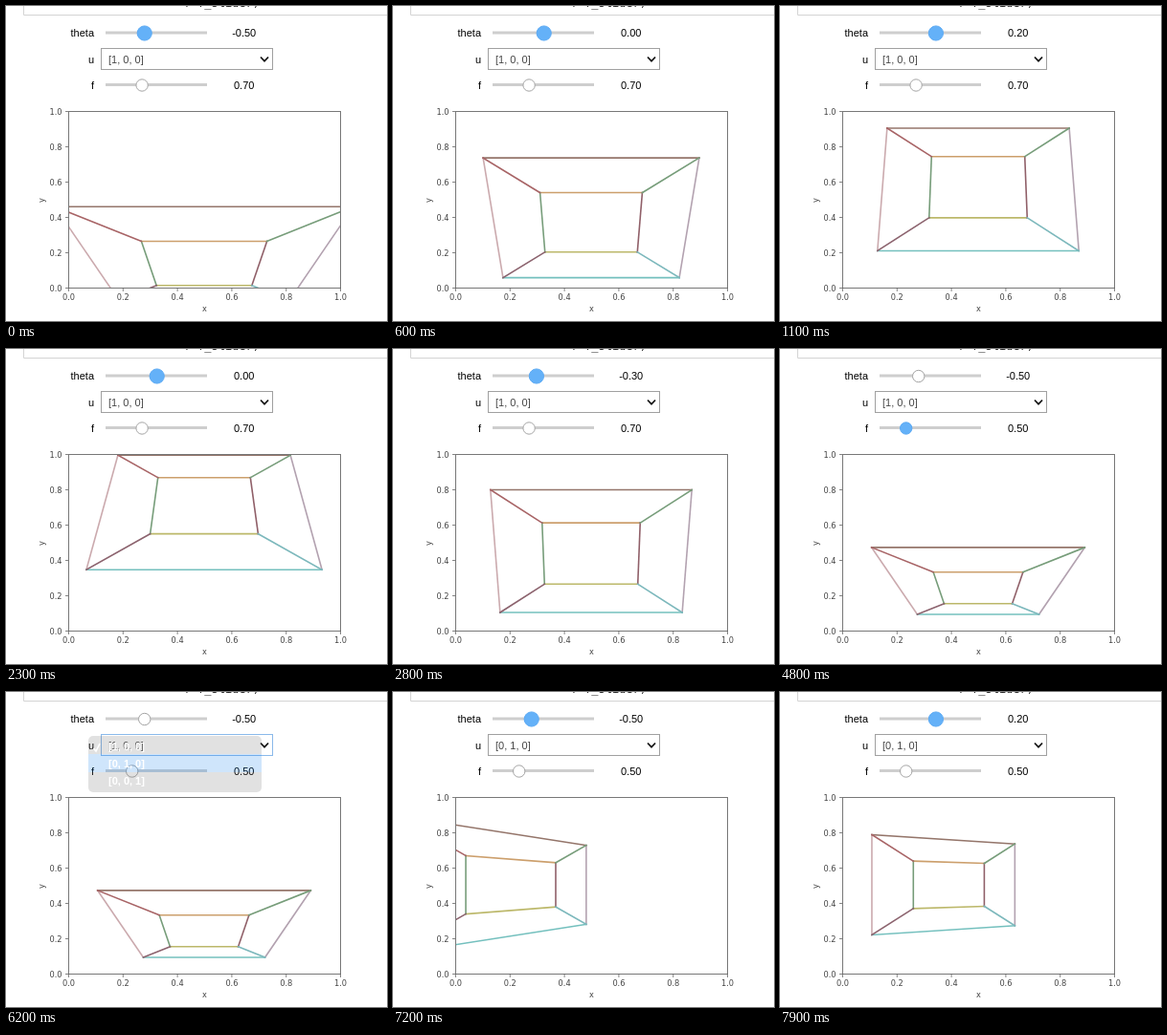
An HTML page with a canvas for the animation above (8 s loop, 398 px wide and 330 px high).

```html
<!DOCTYPE html>
<html lang="en">
<head>
<meta charset="utf-8">
<title>Cube projection</title>
<style>
html, body { margin: 0; width: 100%; height: 100%; overflow: hidden; background: #fff; }
canvas { display: block; }
</style>
</head>
<body>
<canvas id="stage" width="398" height="330"></canvas>
<script>
const ctx = document.getElementById('stage').getContext('2d');
const UI = '11px "Liberation Sans", Arial, sans-serif';
const PLOT = '8.2px "DejaVu Sans", sans-serif';
const MONO = '12px "DejaVu Sans Mono", monospace';
const X0 = 65, Y0 = 295, W = 285, H = 185;
const OPTIONS = ['[1, 0, 0]', '[0, 1, 0]', '[0, 0, 1]'];

// Corner index bits: 1 = right, 2 = top, 4 = far
const EDGES = [
  [0, 2, '#cbaaae'], [1, 3, '#b3a2b0'], [0, 1, '#74c0be'], [2, 3, '#94756a'],
  [4, 5, '#bcb86a'], [6, 7, '#cc9f6c'], [4, 6, '#779d7a'], [5, 7, '#906069'],
  [0, 4, '#8c636e'], [1, 5, '#7cb8bc'], [2, 6, '#a86466'], [3, 7, '#779d7a']
];

// Slider values as [time, value] steps
const THETA = [
  [0, -.5], [100, -.4], [200, -.3], [400, -.2], [500, -.1], [600, 0], [800, .1], [1000, .2],
  [1200, .3], [1400, .4], [2100, .3], [2200, .1], [2300, 0], [2400, -.1], [2600, -.2],
  [2800, -.3], [3000, -.4], [3200, -.5], [7500, -.3], [7600, -.2], [7700, 0], [7800, .1], [7900, .2]
];
const FOCAL = [[0, .7], [4100, .6], [4400, .5]];
const PLOT_FOCAL = [[0, .7], [4300, .6], [4700, .5]];

// Knob states: 0 idle, 1 hovered, 2 dragged
const THETA_KNOB = [[0, 2], [3800, 0], [6700, 1], [7200, 2]];
const FOCAL_KNOB = [[0, 0], [3500, 1], [3800, 2], [4800, 1], [5400, 0]];

const stepAt = (steps, t) => steps.filter(s => s[0] <= t).pop()[1];
const between = (t, a, b) => t >= a && t < b;

// The plot trails behind the slider
function plotTheta(t) {
  let v = -.5;
  if (between(t, 100, 2100)) v = Math.min(.4, -.4 + Math.floor((t - 100) / 200) / 10);
  else if (between(t, 2100, 3300)) v = Math.min(.3, .3 - .8 * (t - 2300) / 1000);
  else if (t >= 7500) v = -.4 + Math.floor((t - 7500) / 200) / 10;
  return Math.round(v * 10) / 10;
}

function text(s, x, y, font, color, align = 'left') {
  ctx.font = font;
  ctx.fillStyle = color;
  ctx.textAlign = align;
  ctx.fillText(s, x, y);
}

function line(color, width, ...pts) {
  ctx.beginPath();
  pts.forEach(p => ctx.lineTo(p[0], p[1]));
  ctx.strokeStyle = color;
  ctx.lineWidth = width;
  ctx.stroke();
}

function slider(name, y, x, value, knob) {
  text(name, 92, y + 4, UI, '#000', 'right');
  text(value.toFixed(2), 248.7, y + 4, UI, '#000', 'center');
  ctx.fillStyle = '#cecece';
  ctx.fillRect(104, y - 1.5, 106, 3);
  ctx.beginPath();
  ctx.arc(x, y + .5, knob === 2 ? 7.6 : 6.2, 0, 7);
  ctx.fillStyle = knob ? '#64b1f8' : '#fff';
  ctx.fill();
  ctx.strokeStyle = knob ? '#5aa9f4' : '#a4a4a4';
  ctx.lineWidth = 1;
  ctx.stroke();
}

function select(choice, focused) {
  text('u', 92, 60, UI, '#000', 'right');
  ctx.strokeStyle = focused ? '#8ab9ea' : '#a0a0a0';
  ctx.lineWidth = 1;
  ctx.strokeRect(99.5, 44.5, 179, 22);
  text(choice, 107, 60, UI, '#444');
  line('#111', 1.8, [266, 53.5], [270, 57.8], [274, 53.5]);
}

function menu(row, alpha) {
  const top = 47 + row * 18, bottom = top + 19;
  ctx.save();
  ctx.globalAlpha = alpha;
  ctx.beginPath();
  ctx.roundRect(86, 46, 181, 59, 5);
  ctx.clip();
  ctx.fillStyle = '#696969';
  ctx.fillRect(86, 46, 181, top - 46);
  ctx.fillRect(86, bottom, 181, 105 - bottom);
  ctx.fillStyle = '#0f7deb';
  ctx.fillRect(86, top, 181, 19);
  ctx.globalAlpha = Math.min(1, alpha * 5);
  OPTIONS.forEach((s, i) => text(s, 107, 60.5 + i * 18, 'bold ' + UI, '#fff'));
  line('#fff', 1.6, [91.5, 59], [94, 62], [98, 54]);
  ctx.restore();
}

function axes() {
  ctx.strokeStyle = '#777';
  ctx.lineWidth = 1;
  ctx.strokeRect(X0 + .5, Y0 - H + .5, W - 1, H);
  for (let i = 0; i <= 5; i++) {
    const x = X0 + .5 + i * (W - 1) / 5, y = Y0 + .5 - i * H / 5, label = (i / 5).toFixed(1);
    line('#666', .8, [x, Y0], [x, Y0 + 4]);
    line('#666', .8, [X0 - 3, y], [X0, y]);
    text(label, x, 308, PLOT, '#444', 'center');
    text(label, 58.5, y + 3, PLOT, '#444', 'right');
  }
  text('x', 207.5, 320, PLOT, '#444', 'center');
  ctx.save();
  ctx.translate(39.5, 203.5);
  ctx.rotate(-Math.PI / 2);
  text('y', 0, 0, PLOT, '#444', 'center');
  ctx.restore();
}

function project(i, theta, f, aboutY) {
  const x = i & 1 ? 1 : -1, y = i & 2 ? 1 : -1, z = i & 4 ? 4 : 2;
  const c = Math.cos(theta), s = Math.sin(theta);
  const [px, py, pz] = aboutY
    ? [x * c + z * s, y, z * c - x * s]
    : [x, y * c + z * s, z * c + y * s];
  return [X0 + (W - 1) * (.5 + f * px / pz), Y0 - .5 - H * (.5 + f * py / pz)];
}

function cube(theta, f, aboutY) {
  ctx.save();
  ctx.beginPath();
  ctx.rect(X0, Y0 - H, W, H + 1);
  ctx.clip();
  ctx.lineCap = 'square';
  for (const [a, b, color] of EDGES)
    line(color, 1.6, project(a, theta, f, aboutY), project(b, theta, f, aboutY));
  ctx.restore();
}

function draw(now) {
  const t = Math.floor(now % 8000 / 100) * 100;
  ctx.fillStyle = '#fff';
  ctx.fillRect(0, 0, 398, 330);

  text('f=f_slider)', 265, 1, MONO, '#222', 'right');
  line('#d4d4d4', 1, [18.5, 0], [18.5, 9.5], [398, 9.5]);

  const theta = stepAt(THETA, t), f = stepAt(FOCAL, t);
  slider('theta', 28, 157.7 + theta * 26, theta, stepAt(THETA_KNOB, t));
  select(OPTIONS[t < 6300 ? 0 : 1], between(t, 5400, 7200));
  slider('f', 82.5, 105.7 + f * 52, f, stepAt(FOCAL_KNOB, t));

  cube(plotTheta(t), stepAt(PLOT_FOCAL, t), t >= 6400);
  axes();
  if (between(t, 5400, 6300))
    menu(t < 5600 ? 0 : 1, Math.min(1, 1 - (t - 6100) / 125));
}

function loop() {
  draw(performance.now());
  requestAnimationFrame(loop);
}
loop();
</script>
</body>
</html>
```
